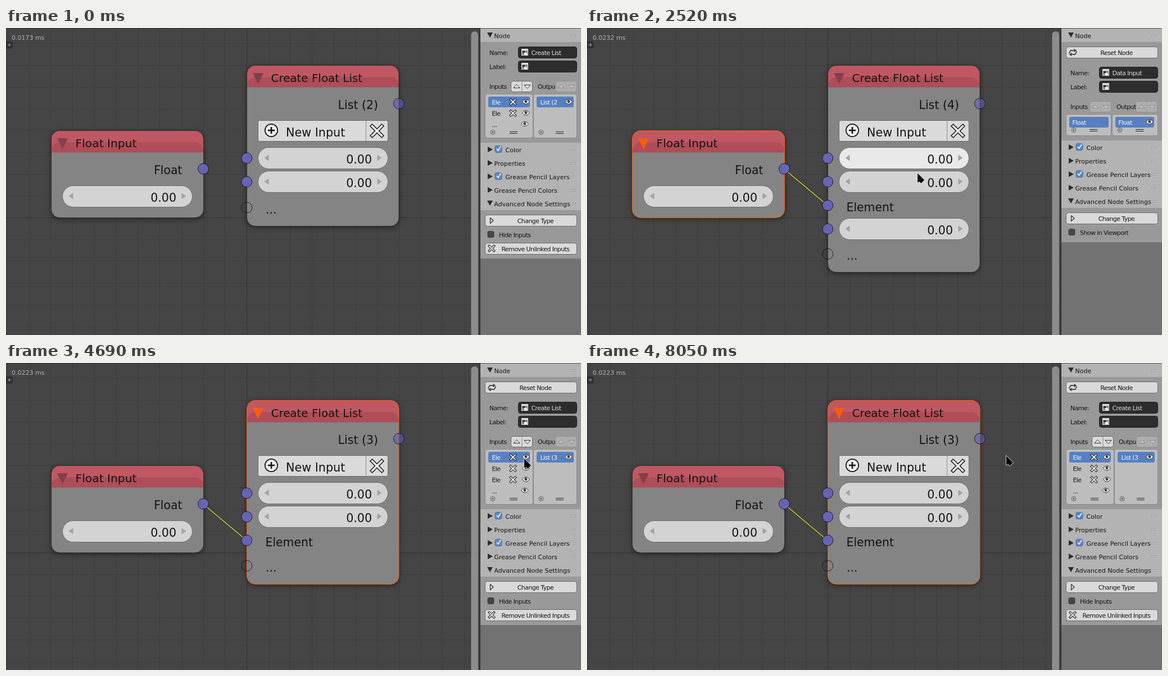
Recreate the animation shown at these times as an HTML page with a canvas. Size 1023 by 546 pixels, loop 8.09 s.

```html
<!DOCTYPE html>
<html lang="en">
<head>
<meta charset="utf-8">
<title>Node editor</title>
<style>
html, body { margin: 0; width: 100%; height: 100%; overflow: hidden; background: #444; }
canvas { display: block; }
</style>
</head>
<body>
<canvas id="stage" width="1023" height="546"></canvas>
<script>
const ctx = document.getElementById('stage').getContext('2d');
const LOOP = 8090;
const FONT = '"DejaVu Sans", sans-serif';
const BLUE = '#5680c2', ORANGE = '#ff5a0a', INK = '#141414';

// Pointer moves: start, end, x, y, optional bend point
const ENTRY = { at: 310, x: 395, y: 205 };
const MOVES = [
  [310, 560, 352, 250],
  [600, 1040, 457, 330],
  [1320, 1900, 562, 180],
  [2360, 2600, 597, 285],
  [2640, 2980, 573, 99],
  [3180, 3660, 898, 225, 730, 330],
  [4370, 4690, 922, 170],
  [6010, 6590, 867, 425],
  [7660, 8050, 746, 165]
];
const CLICKS = [1240, 1940, 3000, 3960, 4930, 5490, 6730, 7520];

function pointer(t) {
  if (t < ENTRY.at) return null;
  let { x, y } = ENTRY;
  for (const [a, b, ex, ey, bx, by] of MOVES) {
    if (t < a) break;
    const u = Math.min(1, (t - a) / (b - a));
    const s = u * u * (3 - 2 * u);
    const mx = bx ?? (x + ex) / 2, my = by ?? (y + ey) / 2;
    const bend = (p, m, q) => (1 - s) ** 2 * p + 2 * s * (1 - s) * m + s * s * q;
    x = bend(x, mx, ex);
    y = bend(y, my, ey);
  }
  return { x, y };
}

function stateAt(t) {
  const within = (a, b) => t >= a && t < b;
  const count = t < 1240 ? 2 : t < 1980 ? 3 : within(1980, 4020) ? 4 : 3;
  const hideFirst = within(4980, 5550), hideAll = within(6790, 7590);
  const items = Array.from({ length: count }, (_, i) => ({
    linked: i === 2,
    hidden: i !== 2 && (hideAll || (hideFirst && i === 0))
  }));
  return {
    items, count, hideAll,
    linked: t >= 1240,
    dragging: within(570, 1240),
    selected: t < 570 ? '' : t < 3060 ? 'input' : 'list',
    tooltip: within(7300, 7520),
    time: t < 1240 ? '0.0173' : t < 1980 ? '0.0245' : t < 4020 ? '0.0232' : '0.0223',
    cursor: pointer(t),
    hover: pointer(t - 60)
  };
}

// Drawing helpers
function box(x, y, w, h, r, fill, stroke) {
  ctx.beginPath();
  ctx.roundRect(x, y, w, h, r);
  if (fill) { ctx.fillStyle = fill; ctx.fill(); }
  if (stroke) { ctx.strokeStyle = stroke; ctx.lineWidth = 1; ctx.stroke(); }
}
function rect(x, y, w, h, fill) {
  ctx.fillStyle = fill;
  ctx.fillRect(x, y, w, h);
}
function disc(x, y, r, fill, stroke, width = 1) {
  ctx.beginPath();
  ctx.arc(x, y, r, 0, 7);
  if (fill) { ctx.fillStyle = fill; ctx.fill(); }
  if (stroke) { ctx.strokeStyle = stroke; ctx.lineWidth = width; ctx.stroke(); }
}
function trace(points) {
  ctx.beginPath();
  for (let i = 0; i < points.length; i += 2) ctx.lineTo(points[i], points[i + 1]);
}
function poly(points, fill) {
  trace(points);
  ctx.closePath();
  ctx.fillStyle = fill;
  ctx.fill();
}
function line(points, color, width = 1) {
  trace(points);
  ctx.strokeStyle = color;
  ctx.lineWidth = width;
  ctx.stroke();
}
function text(s, x, y, color = INK, size = 20.4, align = 'left', spacing = 0) {
  ctx.font = `${size}px ${FONT}`;
  ctx.letterSpacing = spacing + 'px';
  ctx.textAlign = align;
  ctx.fillStyle = color;
  ctx.fillText(s, x, y);
}
const label = (s, x, y, color = INK, align) => text(s, x, y + 4, color, 11, align, -0.58);
const inside = (p, x, y, w, h) => p && p.x >= x && p.x < x + w && p.y >= y && p.y < y + h;

function cross(x, y, r, outer, inner) {
  ctx.lineCap = 'square';
  for (const [color, width] of [[INK, outer], ['#efefef', inner]]) {
    line([x - r, y - r, x + r, y + r], color, width);
    line([x - r, y + r, x + r, y - r], color, width);
  }
  ctx.lineCap = 'butt';
}
function eye(x, y, open) {
  ctx.beginPath();
  if (open) {
    ctx.moveTo(x - 6.5, y);
    ctx.quadraticCurveTo(x, y - 8.5, x + 6.5, y);
    ctx.quadraticCurveTo(x, y + 8.5, x - 6.5, y);
    ctx.fillStyle = '#eee';
    ctx.fill();
    ctx.strokeStyle = '#2a2a2a';
    ctx.lineWidth = 1;
    ctx.stroke();
    disc(x, y - 0.5, 2.4, '#222');
    disc(x + 0.6, y - 1.2, 0.8, '#ddd');
  } else {
    ctx.moveTo(x - 6, y);
    ctx.quadraticCurveTo(x, y + 7, x + 6, y);
    ctx.quadraticCurveTo(x, y + 3.5, x - 6, y);
    ctx.fillStyle = 'rgba(225,225,225,.35)';
    ctx.fill();
    ctx.strokeStyle = 'rgba(40,40,40,.4)';
    ctx.lineWidth = 0.8;
    ctx.stroke();
  }
}
function check(x, y, size, on) {
  const h = size / 2;
  box(x - h, y - h, size, size, 2.5, on ? '#5b86c9' : '#474747', on ? '#4a6ca6' : '#3a3a3a');
  if (on) line([x - 3, y - 0.5, x - 0.5, y + 2.5, x + 4.5, y - 5], '#f4f4f4', 1.7);
}

// Node editor
function grid() {
  rect(0, 0, 844, 546, '#454545');
  const step = 38.7;
  for (let i = -11; i <= 11; i++) {
    const color = i ? '#3e3e3e' : '#323232';
    rect(Math.round(428 + i * step), 0, 1, 546, color);
    rect(0, Math.round(337 + i * step), 844, 1, color);
  }
  rect(0, 0, 844, 1, '#2b2b2b');
  box(827.5, 6, 12.5, 560, 6, '#8d8d8d');
  rect(842, 0, 2, 546, '#333');
  box(-4, 23.5, 16, 13, 4, '#303030');
  line([3, 30, 9, 30], '#999', 1.2);
  line([6, 27, 6, 33], '#999', 1.2);
}
function node(x, y, w, bottom, title, size, selected) {
  const h = bottom - y, r = 15;
  ctx.save();
  ctx.shadowColor = 'rgba(0,0,0,.5)';
  ctx.shadowBlur = 9;
  ctx.shadowOffsetY = 2;
  box(x, y, w, h, r, '#848484');
  ctx.restore();
  ctx.save();
  box(x, y, w, h, r);
  ctx.clip();
  rect(x, y, w, 39, '#bf5863');
  box(x, y + 21, w, h, r, 'rgba(120,40,52,.22)');
  rect(x, y + 39, w, h - 39, '#848484');
  ctx.restore();
  box(x, y, w, h, r, null, selected ? ORANGE : 'rgba(20,20,20,.65)');
  poly([x + 10.5, y + 13.5, x + 29.5, y + 13.5, x + 20, y + 33], selected ? ORANGE : '#84404a');
  text(title, x + 43, y + 29, INK, size);
}
const socket = (x, y, fill = '#6764b4') => disc(x, y, 9.5, fill, 'rgba(15,15,25,.85)');

function numberField(x, y, p) {
  const hot = inside(p, x, y, 231, 38);
  box(x, y, 231, 38, 19, hot ? '#e9e9e9' : '#d3d3d3', '#6c6c6c');
  const m = y + 18.5;
  poly([x + 11, m, x + 19, m - 5.5, x + 19, m + 5.5], '#a2a2a2');
  poly([x + 220, m, x + 212, m - 5.5, x + 212, m + 5.5], '#a2a2a2');
  text('0.00', x + 202.5, y + 28.5, INK, 20.6, 'right');
}
function newInput(p) {
  box(448.5, 164.5, 231, 37, 3, '#dadada', '#686868');
  if (inside(p, 448, 165, 192, 37)) rect(449, 165, 191, 36, '#ededed');
  if (inside(p, 641, 165, 39, 37)) rect(641, 165, 38, 36, '#ededed');
  rect(640, 165, 1, 36, '#8c8c8c');
  disc(472, 182, 11.2, '#eee', INK, 1.7);
  line([466, 182, 478, 182], INK, 2.6);
  line([472, 176, 472, 188], INK, 2.6);
  text('New Input', 498, 193, INK, 20.7);
  cross(660, 183, 8.5, 6.5, 3.6);
}
function nodes(s) {
  const rows = s.items.filter(item => !item.hidden);
  const rowY = i => 231.5 + 42 * i;
  const bottom = s.hideAll ? 264 : 270.5 + 41 * rows.length;
  const target = rows.findIndex(item => item.linked);

  node(80.5, 182.5, 271, 337.5, 'Float Input', 20.3, s.selected === 'input');
  text('Float', 313.5, 260, INK, 20.4, 'right');
  numberField(100.5, 280.5, s.hover);

  node(428.5, 66.5, 270.5, bottom, 'Create Float List', 19.9, s.selected === 'list');
  text(`List (${s.count})`, 662, 144, INK, 20.5, 'right');
  newInput(s.hover);
  rows.forEach((item, i) => {
    if (item.linked) text('Element', 461.5, rowY(i) + 10);
    else numberField(448.5, rowY(i) - 19, s.hover);
  });

  if (s.linked || s.dragging) {
    const c = s.cursor;
    const near = s.dragging && Math.hypot(c.x - 428, c.y - 320) < 35;
    const end = s.linked ? [428, rowY(target)] : near ? [428, 320] : [c.x, c.y];
    line([351, 251, ...end], 'rgba(20,20,20,.6)', 3);
    line([351, 251, ...end], '#f0e63c', 1.5);
  }
  socket(351, 250.5);
  socket(699, 134.5, 'rgba(98,95,185,.55)');
  rows.forEach((_, i) => socket(428.3, rowY(i)));
  if (!s.hideAll) {
    const y = 237 + 41.2 * rows.length;
    socket(428.3, y, null);
    text('...', 462, y + 10.5);
  }
  text(s.time + ' ms', 10, 21, '#b4b4b4', 11);
}

// Sidebar
function heading(y, title, open, checked) {
  rect(844, y - 12, 179, 24, '#b3b3b3');
  rect(844, y + 12, 179, 1, '#979797');
  poly(open ? [856, y - 5, 866, y - 5, 861, y + 4] : [857, y - 5, 857, y + 5, 866, y], '#2c2c2c');
  if (checked) check(876, y - 0.5, 12, true);
  text(title, checked ? 888.5 : 868.5, y + 4.5, INK, 11);
  for (let i = 0; i < 8; i++) {
    const gx = 1004 + (i % 4) * 3, gy = y - 1 + (i >> 2) * 3;
    rect(gx, gy, 1, 1, '#777');
    rect(gx + 1, gy + 1, 1, 1, '#ddd');
  }
}
function button(y, title, p, center = 942) {
  const hot = inside(p, 852, y - 10, 163, 20);
  box(852.5, y - 10, 163, 20, 4, hot ? '#ededed' : '#d9d9d9', '#696969');
  label(title, center, y, INK, 'center');
}
function darkField(y, value) {
  box(911.5, y - 10, 104, 20, 4, '#2d2d2d', '#1f1f1f');
  const iy = Math.floor(y);
  rect(917, iy - 6, 12, 12, '#e4e4e4');
  rect(918, iy - 3, 10, 8, '#8a8a8a');
  rect(919, iy - 2, 4, 3, '#2d2d2d');
  rect(922, iy + 1, 5, 4, '#f4f4f4');
  label(value, 934.5, y, '#dcdcdc');
}
function arrows(x, y, active) {
  ctx.save();
  ctx.globalAlpha = active ? 1 : 0.3;
  box(x, y - 9.5, 38, 19, 4, '#d9d9d9', '#666');
  rect(x + 19, y - 9, 1, 18, '#888');
  for (const [cx, d] of [[x + 10, -1], [x + 29, 1]]) {
    const p = [cx - 5.5, y - 2.5 * d, cx + 5.5, y - 2.5 * d, cx, y + 3.5 * d, cx - 5.5, y - 2.5 * d];
    poly(p, '#f6f6f6');
    line(p, '#222', 1);
  }
  ctx.restore();
}
function listBox(x, w, top, bottom) {
  box(x, top - 0.5, w, bottom - top + 1, 4, '#bdbdbd', '#8a8a8a');
  const y = bottom - 9.5;
  disc(x + 13.5, y, 4, null, '#555', 0.9);
  line([x + 11, y, x + 16, y], '#555', 0.9);
  line([x + 13.5, y - 2.5, x + 13.5, y + 2.5], '#555', 0.9);
  for (const dy of [-1.5, 1.5]) rect(Math.round(x + w / 2 + 1), Math.round(y + dy), 14, 1, '#222');
}
function createLists(s, top, bottom) {
  const y = top + 13.5, white = '#f4f4f4';
  label('Inputs', 860, top - 14);
  arrows(898.5, top - 14, true);
  label('Outpu', 946, top - 14);
  arrows(977.5, top - 14, false);
  listBox(852.5, 85, top, bottom);
  listBox(938.5, 77, top, bottom);
  box(858, y - 9.5, 74, 19, 3, BLUE);
  s.items.forEach((item, i) => {
    const ry = y + 20 * i;
    label('Ele', 864.5, ry, i ? INK : white);
    cross(902, ry, 4, 4, 2);
    eye(925, ry - 0.5, !item.hidden);
  });
  const last = y + 20 * s.count;
  label('...', 864.5, last);
  eye(923, last - 1, !s.hideAll);
  box(944, y - 9.5, 66, 19, 3, BLUE);
  label(`List (${s.count}`, 950.5, y, white);
  eye(1001, y - 0.5, true);
}
function inputLists(top, bottom) {
  const y = top + 13.5;
  label('Inputs', 860, top - 14);
  arrows(894.5, top - 14, false);
  label('Output', 942, top - 14);
  arrows(976.5, top - 14, false);
  listBox(852.5, 80, top, bottom);
  listBox(934.5, 81, top, bottom);
  box(858, y - 9.5, 70, 19, 3, BLUE);
  box(940, y - 9.5, 69, 19, 3, BLUE);
  label('Float', 863.5, y, '#f4f4f4');
  label('Float', 945.5, y, '#f4f4f4');
  eye(920, y, false);
  eye(1001, y - 0.5, true);
}
function resetIcon(x, y) {
  for (const d of [-1, 1]) {
    line([x - d * 7, y + d * 2, x - d * 4, y - d * 3.5, x + d * 4, y - d * 3.5], '#222', 1.4);
    line([x + d * 2, y - d * 6, x + d * 5.5, y - d * 3.5, x + d * 2, y - d], '#222', 1.2);
  }
}
function sidebar(s) {
  const isInput = s.selected === 'input';
  const shift = s.selected ? 36 : 0;
  const rows = isInput ? 1 : s.count + 1;
  const top = 118 + shift;
  const bottom = 135 + shift + 20 * rows;
  const first = bottom + 21, last = first + 96;

  ctx.save();
  ctx.beginPath();
  ctx.rect(844, 0, 179, 546);
  ctx.clip();
  rect(844, 0, 179, 546, '#727272');
  rect(844, 1, 179, last + (isInput ? 72 : 97), '#999');
  rect(844, 0, 179, 1, '#555');
  heading(13, 'Node', true);
  if (shift) {
    button(43.5, 'Reset Node', s.hover);
    resetIcon(864.5, 43.5);
  }
  label('Name:', 860, 43.5 + shift);
  darkField(43.5 + shift, isInput ? 'Data Input' : 'Create List');
  label('Label:', 860, 68.5 + shift);
  darkField(68.5 + shift, '');
  if (isInput) inputLists(top, bottom);
  else createLists(s, top, bottom);

  heading(first, 'Color', false, true);
  heading(first + 24, 'Properties', false);
  heading(first + 48, 'Grease Pencil Layers', false, true);
  heading(first + 72, 'Grease Pencil Colors', false);
  heading(last, 'Advanced Node Settings', true);

  button(last + 30.5, 'Change Type', s.hover);
  const ty = last + 30.5;
  line([861.5, ty - 5, 861.5, ty + 5, 867, ty, 861.5, ty - 5], '#222', 1.1);
  const cy = last + 55.5;
  const hot = inside(s.hover, 852, cy - 10, 163, 20);
  check(862.5, cy - 0.5, 11, !isInput && s.hideAll);
  label(isInput ? 'Show in Viewport' : 'Hide Inputs', 877, cy, hot ? '#f4f4f4' : INK);
  if (!isInput) {
    button(last + 80.5, 'Remove Unlinked Inputs', s.hover);
    cross(864, last + 80, 4.2, 4, 2);
  }
  ctx.restore();
}

function tooltip() {
  box(600.5, 438.5, 414, 50, 4, 'rgba(25,25,25,.94)', '#111');
  label('Hide or show all inputs of this node that have no link.', 610, 453, '#f0f0f0');
  label('Value: node_groups["NodeTree"].nodes["Create List"].hide_inputs', 610, 474, '#888');
}
function clickDot(t, c) {
  const at = CLICKS.find(k => t >= k && t < k + 280);
  const u = at === undefined ? 0 : (t - at) / 280;
  if (at === undefined && !(t >= 570 && t < 1240)) return;
  disc(c.x, c.y, 8 + 5 * u, `rgba(78,138,205,${0.75 * (1 - u)})`);
}
function arrowCursor({ x, y }) {
  ctx.save();
  ctx.translate(x, y);
  ctx.lineJoin = 'round';
  trace([0, 0, 0, 16.5, 3.5, 14.8, 6.5, 18, 12, 12]);
  ctx.closePath();
  ctx.strokeStyle = '#e8e8e8';
  ctx.lineWidth = 1.6;
  ctx.stroke();
  ctx.fillStyle = '#080808';
  ctx.fill();
  ctx.restore();
}

function draw() {
  const t = performance.now() % LOOP;
  const s = stateAt(t);
  grid();
  nodes(s);
  sidebar(s);
  if (s.tooltip) tooltip();
  if (s.cursor) {
    clickDot(t, s.cursor);
    arrowCursor(s.cursor);
  }
  requestAnimationFrame(draw);
}
draw();
</script>
</body>
</html>
```
